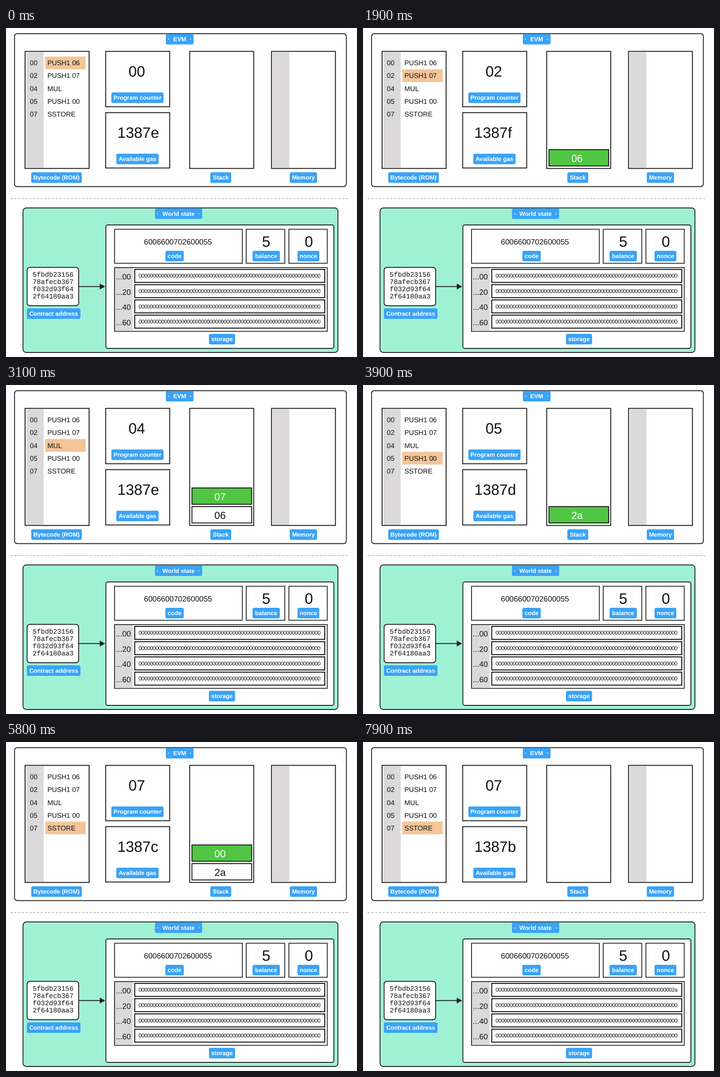
Recreate the animation shown at these times as an HTML page. Size 773 px wide and 725 px high, loop 8000 ms.

```html
<!DOCTYPE html>
<html lang="en">
<head>
<meta charset="utf-8">
<title>EVM storage walkthrough</title>
<style>
  html, body { margin: 0; width: 100%; height: 100%; overflow: hidden; background: #fefefe; }
  svg { display: block; width: 100vw; height: 100vh; }
  text { font-family: "Liberation Sans", Arial, sans-serif; fill: #111; text-rendering: geometricPrecision; white-space: pre; }
  .mono { font-family: "Liberation Mono", "Courier New", monospace; }
  .label { font-size: 13.1px; font-weight: bold; fill: #fff; }
  .word { font-size: 12px; letter-spacing: -0.035em; }
</style>
</head>
<body>
<svg id="stage" viewBox="0 0 773 725"></svg>
<script>
const LOOP = 8000;
const ZEROS = "0".repeat(64);
const INK = "#222";

// start time, program row, counter, gas, stack (bottom first), first storage slot
const STEPS = [
  { at: 0,    row: 0, pc: "00", gas: "1387e", stack: [],           slot: ZEROS },
  { at: 1000, row: 1, pc: "02", gas: "1387f", stack: ["06"],       slot: ZEROS },
  { at: 2200, row: 2, pc: "04", gas: "1387e", stack: ["06", "07"], slot: ZEROS },
  { at: 3600, row: 3, pc: "05", gas: "1387d", stack: ["2a"],       slot: ZEROS },
  { at: 5200, row: 4, pc: "07", gas: "1387c", stack: ["2a", "00"], slot: ZEROS },
  { at: 6400, row: 4, pc: "07", gas: "1387b", stack: [],           slot: ZEROS.slice(2) + "2a" }
];

const PROGRAM = [["00", "PUSH1 06"], ["02", "PUSH1 07"], ["04", "MUL"], ["05", "PUSH1 00"], ["07", "SSTORE"]];

const stage = document.getElementById("stage");

function add(tag, attrs, content) {
  const el = document.createElementNS("http://www.w3.org/2000/svg", tag);
  for (const key in attrs) el.setAttribute(key, attrs[key]);
  if (content !== undefined) el.textContent = content;
  stage.appendChild(el);
  return el;
}

// Rectangle given by its left, top, right and bottom edges
function box(x1, y1, x2, y2, attrs) {
  return add("rect", {
    x: x1, y: y1, width: x2 - x1, height: y2 - y1,
    fill: "#fefefe", stroke: "#111", "stroke-width": 1.9, ...attrs
  });
}

function fillBox(x1, y1, x2, y2, fill) {
  return box(x1, y1, x2, y2, { fill, stroke: "none" });
}

function text(x, y, size, content, attrs) {
  return add("text", { x, y, "font-size": size, ...attrs }, content);
}

function centered(x, y, size, content) {
  return text(x, y, size, content, { "text-anchor": "middle" });
}

function label(x1, x2, y, content, dots) {
  const mid = (x1 + x2) / 2;
  const put = (x, s) => add("text", { class: "label", x, y: y + 16, "text-anchor": "middle" }, s);
  box(x1, y, x2, y + 23.3, { fill: "#3aa3f6", stroke: "none", rx: 3.5 });
  put(mid, content);
  if (dots) {
    put(x1 + 6.5, "·");
    put(x2 - 6.5, "·");
  }
}

// Virtual machine
box(18.8, 12.5, 749.6, 349.5, { rx: 6, stroke: INK });
label(352, 413, 13, "EVM", true);

box(42, 51.5, 183, 309.5);
fillBox(44.5, 53.5, 83, 308, "#dbd9da");
const marker = fillBox(86.5, 63, 175.5, 91, "#f3c598");
PROGRAM.forEach(([address, op], i) => {
  const y = 82.3 + i * 28.1;
  text(52.6, y, 15.1, address);
  text(91.2, y, 15.1, op);
});
label(55.5, 167, 318, "Bytecode (ROM)");

box(219.5, 51.5, 360.5, 173.5);
const counter = centered(288, 107.2, 33, "");
label(232, 347, 142, "Program counter");

box(219.5, 186.5, 360.5, 308.5);
const gas = text(245.3, 242.3, 33, "");
label(243, 336, 277, "Available gas");

box(404.5, 51.5, 545.5, 309.5);
const cells = [268, 226.8].map(y => ({
  frame: box(409.5, y, 541, y + 36),
  value: centered(471.5, y + 27, 22.3, "")
}));
label(450, 496, 318, "Stack");

box(584.7, 51.5, 725.5, 309.5);
fillBox(587, 53.5, 624, 308, "#dbd9da");
label(625, 685, 318, "Memory");

add("line", { x1: 10, y1: 375.8, x2: 755, y2: 375.8, stroke: "#aaa", "stroke-width": 1.4, "stroke-dasharray": "5 3.3" });

// World state
box(37.5, 396.5, 731, 715, { rx: 7, fill: "#9ff1d4", stroke: INK });
label(328, 432, 397.5, "World state", true);

box(46.5, 527.5, 160, 612, { rx: 6, stroke: INK });
["5fbdb23156", "78afecb367", "f032d93f64", "2f64180aa3"].forEach((line, i) =>
  text(58.8, 548.1 + i * 15.8, 15, line, { class: "mono" }));
label(46, 164, 617.8, "Contract address");
add("path", { d: "M161 569.7H208", stroke: INK, "stroke-width": 1.9 });
add("path", { d: "M206.5 563.2L218.5 569.7L206.5 576.2Z", fill: INK });

box(220, 434, 722, 706, { rx: 4, stroke: INK });
[[239, 520.5], [529, 614], [623, 707.5]].forEach(([x1, x2]) =>
  box(x1, 443.5, x2, 518.5, { stroke: INK, "stroke-width": 1.8 }));
centered(378.8, 477, 16.85, "6006600702600055");
centered(573, 482.3, 33, "5");
centered(667, 482.3, 33, "0");
label(351, 391.5, 491, "code");
label(543, 603, 491, "balance");
label(642, 690, 491, "nonce");

box(239, 528, 707.5, 668.5, { stroke: INK, "stroke-width": 1.8 });
fillBox(240, 529, 279, 667.5, "#dbd9da");
const slots = ["00", "20", "40", "60"].map((offset, i) => {
  const y = 532 + i * 33.6;
  text(241.8, y + 22, 17, "..." + offset);
  box(283.5, y, 702, y + 28.6, { "stroke-width": 2.1 });
  return add("text", { class: "word", x: 292, y: y + 18.3 }, ZEROS);
});
label(447, 504.5, 674, "storage");

function show(step) {
  marker.setAttribute("y", 63 + step.row * 28.1);
  counter.textContent = step.pc;
  gas.textContent = step.gas;
  slots[0].textContent = step.slot;
  cells.forEach(({ frame, value }, i) => {
    const used = i < step.stack.length;
    const top = i === step.stack.length - 1;
    frame.style.display = value.style.display = used ? "" : "none";
    frame.style.fill = top ? "#51c644" : "#fefefe";
    value.style.fill = top ? "#fff" : "#111";
    value.textContent = used ? step.stack[i] : "";
  });
}

const start = performance.now();
let current;

function tick() {
  const t = (performance.now() - start) % LOOP;
  const step = STEPS.findLast(s => s.at <= t);
  if (step !== current) show(current = step);
  requestAnimationFrame(tick);
}

tick();
</script>
</body>
</html>
```
